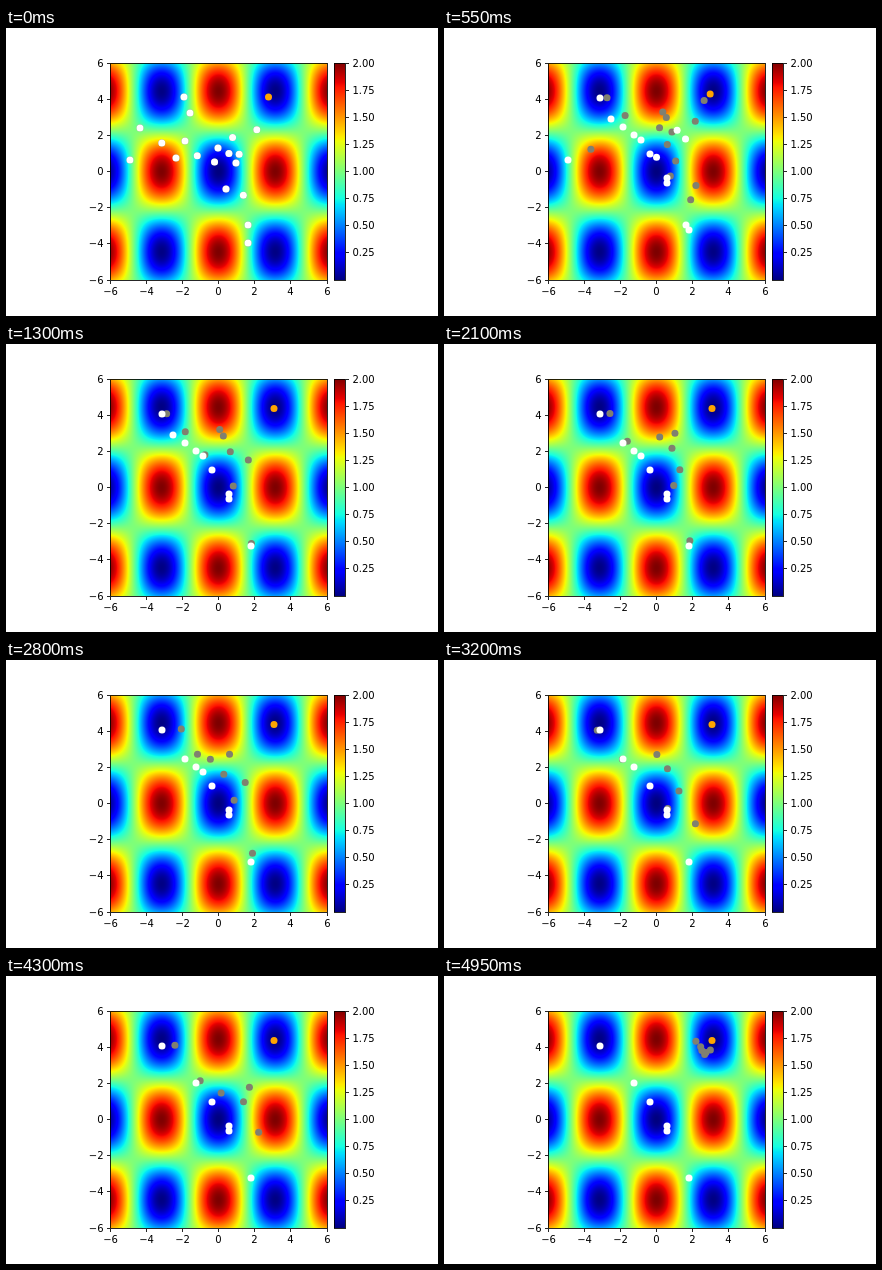
Animation, 432 px wide and 288 px high, one loop 5000 ms. Source, as an HTML page with a canvas:

```html
<!DOCTYPE html>
<html lang="en">
<head>
<meta charset="utf-8">
<title>Particle swarm</title>
<style>
  html, body { margin: 0; width: 100%; height: 100%; overflow: hidden; background: #fff; }
  canvas { display: block; width: 432px; height: 288px; }
</style>
</head>
<body>
<canvas id="stage" width="432" height="288"></canvas>
<script>
const ctx = document.getElementById('stage').getContext('2d');
const LEFT = 104, TOP = 35, SIZE = 217;
const BAR_X = 328, BAR_W = 11;
const UNIT = SIZE / 12;
const STEP_MS = 50, STEPS = 100;
const SEARCH = 11;   // steps in which the best points still improve
const PULL = 6;      // steps a particle takes to fall into the leader

const clamp = v => Math.max(0, Math.min(1, v));
const mix = (a, b, u) => a + (b - a) * u;
const mixPoint = (a, b, u) => [mix(a[0], b[0], u), mix(a[1], b[1], u)];
const jumps = u => Math.floor(clamp(u) * 3) / 3;
const snap = v => Math.floor(v) + .5;

let seed = 7;
function random(min = 0, max = 1) {
  seed = (seed * 16807) % 2147483647;
  return mix(min, max, seed / 2147483647);
}

// A particle swings between its own best point and the leader
// until, at step `joins`, it finds the leader's valley itself.
function particle(start, home, joins = STEPS) {
  return {
    start, home, joins,
    reach: random(.08, .24), rate: random(.6, 1),
    wobble: random(-.18, .18), wobbleRate: random(.5, 1.1)
  };
}

const swarm = [
  particle([178, 69], [156, 70]),
  particle([170, 130], [190, 107]),
  particle([212, 120], [206, 126]),
  particle([230, 135], [223, 150]),
  particle([220, 161], [223, 155]),
  particle([242, 215], [245, 202]),
  particle([184, 85], [179, 99], 85),
  particle([179, 113], [197, 112], 64),
  particle([134, 100], [167, 91], 32),
  particle([242, 197], [242, 197], 24),
  particle([124, 132], [124, 132], 18)
];
for (let i = 0; i < 8; i++) {
  const start = [random(145, 284), random(74, 175)];
  const home = mixPoint(start, leaderAt(SEARCH), random(0, .5));
  swarm.push(particle(start, home, Math.round(random(8, 22))));
}

function leaderAt(step) {
  return mixPoint([262.5, 69], [268, 64.5], jumps(step / 16));
}

function bestOf(p, step) {
  return mixPoint(p.start, p.home, jumps(step / SEARCH));
}

function positionOf(p, step) {
  const swing = p.reach * (1 - Math.cos(p.rate * step))
    + p.wobble * Math.sin(p.wobbleRate * step);
  const pull = clamp((step - p.joins + PULL) / PULL);
  return mixPoint(bestOf(p, step), leaderAt(step), mix(swing, 1, pull));
}

function jet(v) {
  return [
    Math.min((v - .35) / .31, 1 - (v - .89) / .22),
    Math.min((v - .125) / .25, 1 - (v - .64) / .27),
    Math.min(.5 + v / .22, 1 - (v - .34) / .31)
  ].map(c => Math.round(255 * clamp(c)));
}

const griewank = (x, y) =>
  1 + (x * x + y * y) / 4000 - Math.cos(x) * Math.cos(y / Math.SQRT2);

function line(x1, y1, x2, y2) {
  ctx.beginPath();
  ctx.moveTo(x1, y1);
  ctx.lineTo(x2, y2);
  ctx.stroke();
}

function heat(x, y, w, h, value) {
  const image = ctx.createImageData(w, h);
  for (let j = 0; j < h; j++) {
    for (let i = 0; i < w; i++) {
      image.data.set([...jet(value(i + .5, j + .5) / 2), 255], 4 * (j * w + i));
    }
  }
  ctx.putImageData(image, x, y);
}

function drawChart() {
  const right = BAR_X + BAR_W, bottom = TOP + SIZE;
  ctx.fillStyle = '#fff';
  ctx.fillRect(0, 0, 432, 288);
  heat(LEFT, TOP, SIZE, SIZE, (i, j) => griewank(i / UNIT - 6, 6 - j / UNIT));
  heat(BAR_X, TOP, BAR_W, SIZE, (i, j) => 2 * (1 - j / SIZE));

  ctx.strokeStyle = 'rgba(0, 0, 0, .85)';
  ctx.fillStyle = '#000';
  ctx.lineWidth = 1;
  ctx.strokeRect(LEFT + .5, TOP + .5, SIZE, SIZE);
  ctx.strokeRect(BAR_X + .5, TOP + .5, BAR_W, SIZE);
  ctx.font = '10px "DejaVu Sans", sans-serif';
  for (let n = -6; n <= 6; n += 2) {
    const label = String(n).replace('-', '\u2212');
    const x = snap(LEFT + (n + 6) * UNIT), y = snap(TOP + (6 - n) * UNIT);
    line(x, bottom + 1, x, bottom + 4);
    line(LEFT - 3, y, LEFT, y);
    ctx.textAlign = 'center';
    ctx.fillText(label, x, 267);
    ctx.textAlign = 'right';
    ctx.fillText(label, LEFT - 6.4, y + 3.5);
  }
  ctx.textAlign = 'left';
  for (let v = .25; v <= 2; v += .25) {
    const y = snap(TOP + SIZE * (1 - v / 2));
    line(right + 1, y, right + 4, y);
    ctx.fillText(v.toFixed(2), right + 7.4, y + 3.5);
  }
}

function dot([x, y], color) {
  ctx.fillStyle = color;
  ctx.beginPath();
  ctx.arc(x, y, 3.5, 0, 2 * Math.PI);
  ctx.fill();
}

drawChart();
const chart = document.createElement('canvas');
chart.width = 432;
chart.height = 288;
chart.getContext('2d').drawImage(ctx.canvas, 0, 0);

const begin = performance.now();
function frame() {
  const step = Math.floor((performance.now() - begin) / STEP_MS) % STEPS;
  const searching = swarm.filter(p => step < p.joins);
  ctx.drawImage(chart, 0, 0);
  searching.forEach(p => dot(positionOf(p, step), '#808070'));
  searching.forEach(p => dot(bestOf(p, step), '#fff'));
  dot(leaderAt(step), '#ffa500');
  requestAnimationFrame(frame);
}
frame();
</script>
</body>
</html>
```
